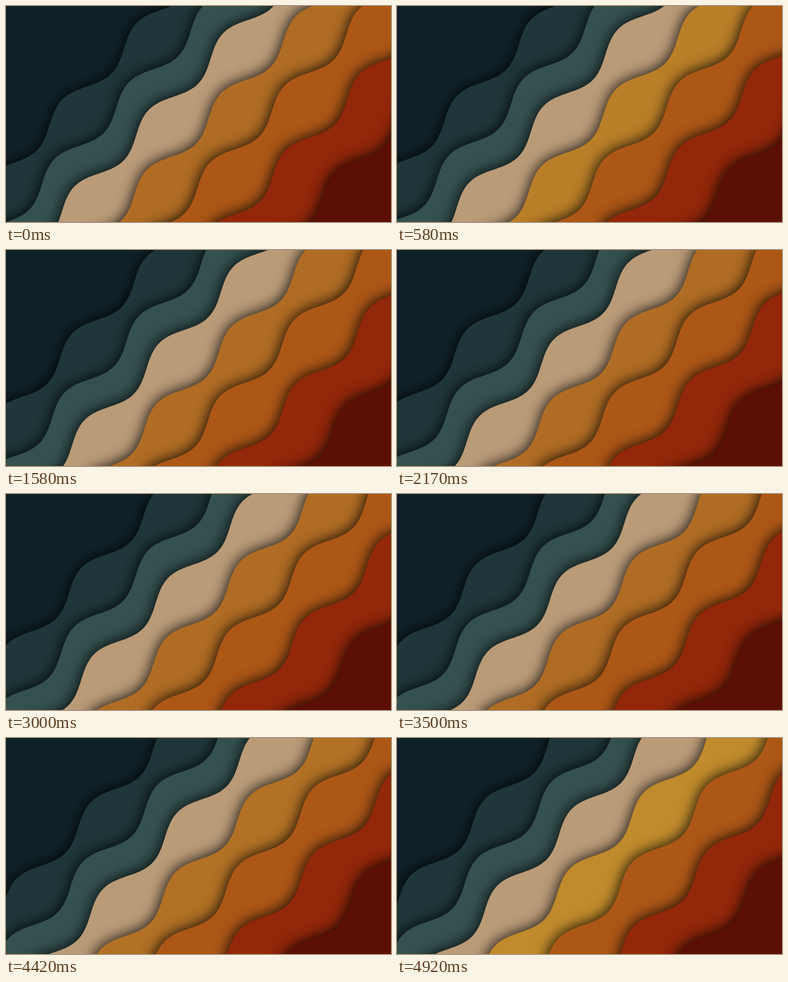
Write an HTML page with a canvas that moves like this. It is 600 by 338 pixels and loops after 5.01 s.

```html
<!DOCTYPE html>
<html lang="en">
<head>
<meta charset="utf-8">
<title>Layered waves</title>
<style>
  html, body { margin: 0; width: 100%; height: 100%; overflow: hidden; background: #102229; }
  canvas { display: block; }
</style>
</head>
<body>
<canvas id="stage" width="600" height="338"></canvas>
<script>
const ctx = document.getElementById('stage').getContext('2d');

const LOOP = 5010, STEP = 1000 / 12, LAST = 59;
const PERIOD = 236, AMP = 19, TILT = 0.017, SPEED = 101 / LAST;

// Each layer lies below its edge: offset is x + y, phase is x - y at a crest.
const layers = [
  { offset: 251, phase: 59,  color: '#1f373a' },
  { offset: 330, phase: 190, color: '#345150' },
  { offset: 404, phase: 178, color: '#ba9b78' },
  { offset: 493, phase: 81,  color: '#b06c24', glow: [192, 139, 44] },
  { offset: 582, phase: 191, color: '#ad5717' },
  { offset: 683, phase: 91,  color: '#92270a' },
  { offset: 796, phase: 134, color: '#5c0f04' }
];

const glowSteps = [[0, 0], [7, 0.6], [14, 0], [52, 0], [59, 1]];

function glowAt(step) {
  const i = glowSteps.findIndex(([s]) => s >= step);
  if (i <= 0) return 0;
  const [s0, v0] = glowSteps[i - 1], [s1, v1] = glowSteps[i];
  return v0 + (v1 - v0) * (step - s0) / (s1 - s0);
}

function wavePath({ offset, phase }, shift) {
  const path = new Path2D();
  for (let a = -760; a <= 760; a += 4) {
    const angle = 2 * Math.PI * (a - phase - shift) / PERIOD;
    const sum = offset - TILT * (a - 60) + AMP * Math.cos(angle);
    path.lineTo((sum + a) / 2, (sum - a) / 2);
  }
  path.lineTo(1200, -300);
  path.lineTo(1200, 1200);
  path.lineTo(-300, 1200);
  path.closePath();
  return path;
}

function draw(step) {
  ctx.fillStyle = '#102229';
  ctx.fillRect(0, 0, 600, 338);
  for (const layer of layers) {
    const path = wavePath(layer, step * SPEED);
    ctx.save();
    ctx.shadowColor = 'rgba(0, 0, 0, 0.8)';
    ctx.shadowBlur = 20;
    ctx.shadowOffsetX = ctx.shadowOffsetY = -2;
    ctx.fillStyle = layer.color;
    ctx.fill(path);
    ctx.restore();
    if (layer.glow) {
      ctx.fillStyle = `rgba(${layer.glow}, ${glowAt(step)})`;
      ctx.fill(path);
    }
  }
}

const start = performance.now();
let shown = -1;

function tick() {
  const t = (performance.now() - start) % LOOP;
  const step = Math.min(LAST, Math.floor((t + 3.4) / STEP));
  if (step !== shown) draw(shown = step);
  requestAnimationFrame(tick);
}
tick();
</script>
</body>
</html>
```
